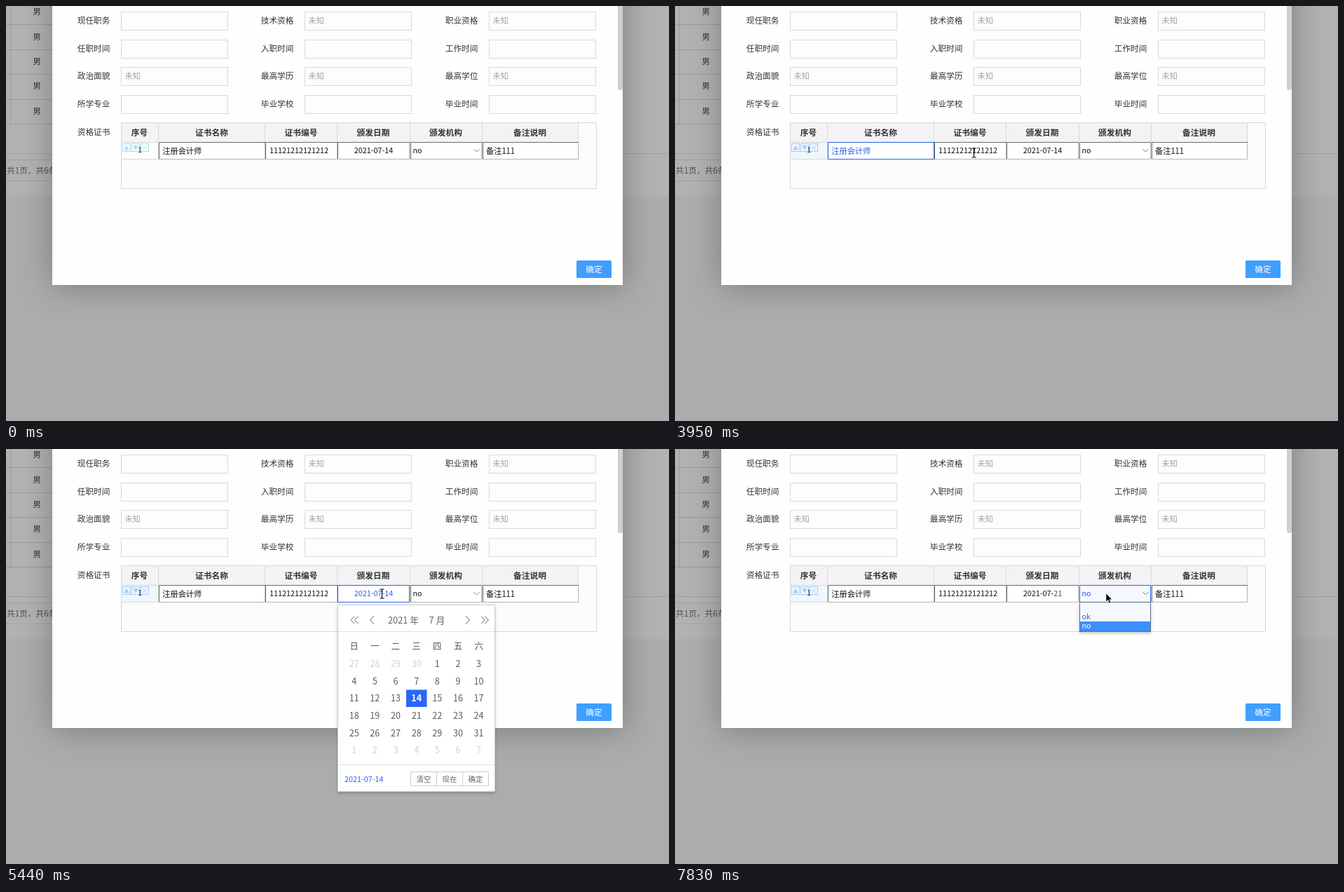
Write an HTML page that moves like this. It is 946 px wide and 592 px high and loops after 8000 ms.

```html
<!DOCTYPE html>
<html lang="zh-CN">
<head>
<meta charset="utf-8">
<title>资格证书</title>
<style>
  html, body { margin: 0; width: 100%; height: 100%; overflow: hidden; background: #abadac; }
  svg { display: block; width: 946px; height: 592px; }
  text { font-family: "Noto Sans CJK SC", "Noto Sans CJK", "Noto Sans", sans-serif; white-space: pre; }
</style>
</head>
<body>
<svg id="stage" viewBox="0 0 946 592">
  <defs>
    <filter id="deep" x="-20%" y="-30%" width="140%" height="160%" color-interpolation-filters="sRGB">
      <feDropShadow dx="1" dy="1" stdDeviation="23" flood-opacity=".3"/>
    </filter>
    <filter id="soft" x="-10%" y="-10%" width="120%" height="125%" color-interpolation-filters="sRGB">
      <feDropShadow dx="0" dy="2" stdDeviation="2" flood-opacity=".22"/>
    </filter>
  </defs>
</svg>
<script>
const LOOP = 8000, BLUE = '#2b62e8', LINE = '#d6d9d8';
const stage = document.getElementById('stage');

function add(parent, tag, attrs) {
  const el = document.createElementNS(stage.namespaceURI, tag);
  set(el, attrs);
  return parent.appendChild(el);
}
function set(el, attrs) {
  for (const k in attrs) el.setAttribute(k, attrs[k]);
}
const fillBox = (p, x, y, width, height, fill, more) => add(p, 'rect', { x, y, width, height, fill, ...more });
const frame = (p, x, y, w, h, fill, stroke) =>
  add(p, 'rect', { x: x + .5, y: y + .5, width: w - 1, height: h - 1, fill, stroke });
const path = (p, d, stroke, more) => add(p, 'path', { d, stroke, fill: 'none', ...more });
// x is the anchor, y the optical middle of the glyphs
function write(p, str, x, y, size, fill, anchor = 'start', more) {
  const el = add(p, 'text', { x, y: y + size * .38, 'font-size': size, fill, 'text-anchor': anchor, ...more });
  el.textContent = str;
  return el;
}
const show = (el, on) => set(el, { visibility: on ? 'visible' : 'hidden' });
const clamp = v => Math.min(1, Math.max(0, v));

// Dimmed page behind the dialog
fillBox(stage, 0, 0, 946, 592, '#abadac');
fillBox(stage, 0, 0, 946, 271, '#b2b2b2');
[26, 62, 97, 133, 168].forEach(y => fillBox(stage, 0, y, 70, 1, '#999'));
fillBox(stage, 6, 0, 1, 168, '#9c9c9c');
[8, 44, 79, 114, 150].forEach(y => write(stage, '男', 44, y, 11.7, '#333', 'middle'));
fillBox(stage, 0, 210, 946, 1, '#a0a0a0');
fillBox(stage, 0, 219, 70, 1, '#a0a0a0');
fillBox(stage, 0, 249, 70, 1, '#a0a0a0');
write(stage, '共1页，共6条', 1, 235, 11.7, '#505050');

// Dialog and form
fillBox(stage, 66, -300, 814, 698, '#fefefe', { filter: 'url(#deep)' });
fillBox(stage, 873, -10, 7, 130, '#d0d0d0', { rx: 3 });
const unknown = '未知';
[
  [8, ['现任职务', '', '技术资格', unknown, '职业资格', unknown]],
  [48, ['任职时间', '', '入职时间', '', '工作时间', '']],
  [87, ['政治面貌', unknown, '最高学历', unknown, '最高学位', unknown]],
  [127, ['所学专业', '', '毕业学校', '', '毕业时间', '']]
].forEach(([y, cells]) => [164, 426, 689].forEach((x, i) => {
  write(stage, cells[2 * i], x - 15.5, y + 12.7, 11.7, '#333', 'end');
  frame(stage, x, y, 153, 27, '#fbfefd', LINE);
  write(stage, cells[2 * i + 1], x + 5.5, y + 12.7, 11.2, '#a3a3a3');
}));
write(stage, '资格证书', 148.5, 180, 11.7, '#333', 'end');
fillBox(stage, 814, 363, 50, 25, '#409eff', { rx: 1.5 });
write(stage, '确定', 839, 376, 11.7, '#fff', 'middle');

// Certificate table
frame(stage, 164, 166, 679, 95, '#fcfcfc', LINE);
fillBox(stage, 165, 167, 652, 27, '#f3f3f5');
const rowTint = fillBox(stage, 165, 195, 53, 23, '#eff6fe');
fillBox(stage, 165, 194, 652, 1, LINE);
fillBox(stage, 165, 218, 653, 1, LINE);
[217, 369, 472, 576, 679, 816].forEach(x => fillBox(stage, x, 167, 1, 52, LINE));
[['序号', 190.5], ['证书名称', 293.5], ['证书编号', 421], ['颁发日期', 524], ['颁发机构', 627.5], ['备注说明', 747.5]]
  .forEach(([s, x]) => write(stage, s, x, 180.5, 11.7, '#333', 'middle', { 'font-weight': 700 }));

const tools = add(stage, 'g', {});
[166, 179, 192].forEach(x => add(tools, 'rect', { x: x + .5, y: 196.5, width: 11, height: 11, fill: 'none' }));
add(tools, 'path', { d: 'M169 205l3-5.5 3 5.5zM182 199.5h6l-3 5.5z', class: 'solid' });
add(tools, 'path', { d: 'M195 199.5l5.5 5.5M200.5 199.5l-5.5 5.5', fill: 'none' });
write(stage, '1', 191, 204.5, 11, '#333', 'middle');

function cell(x, w, str, tx, size = 10.8, anchor) {
  const g = add(stage, 'g', {});
  const bg = fillBox(g, x, 194, w, 25, '#fff');
  const light = path(g, `M${x + w - .5} 194v24.5H${x}`, '#b4b4b4');
  const dark = path(g, `M${x + .5} 218V194.5H${x + w}`, '#6c6c6c');
  const label = write(g, str, tx, 206.3, size, '#111', anchor);
  return {
    g, bg, label,
    focus(on) {
      set(light, { stroke: on ? BLUE : '#b4b4b4' });
      set(dark, { stroke: on ? BLUE : '#6c6c6c' });
      set(label, { fill: on ? BLUE : '#111' });
    }
  };
}
const nameCell = cell(218, 152, '注册会计师', 223.3, 11.2);
const codeCell = cell(370, 103, '11121212121212', 376);
const dateCell = cell(473, 103, '', 524.5, 10.8, 'middle');
const orgCell = cell(577, 102, 'no', 580.5);
cell(680, 137, '备注111', 685, 11.2);
const dateHead = add(dateCell.label, 'tspan', {});
const dateDay = add(dateCell.label, 'tspan', {});
dateHead.textContent = '2021-07-';
path(orgCell.g, 'M667.5 204l4 4 4-4', '#777');
const nameCaret = fillBox(stage, 279, 201, 1, 12, BLUE);
const codeCaret = fillBox(stage, 424, 201, 1, 12, BLUE);

// Drop-down list
const list = add(stage, 'g', {});
add(list, 'rect', { x: 577.5, y: 218.5, width: 101, height: 42, fill: '#f5f9ff', stroke: '#66707f', filter: 'url(#soft)' });
fillBox(list, 578, 246, 100, 14, '#3d8fff');
write(list, 'ok', 580.5, 239, 10.8, BLUE);
write(list, 'no', 580.5, 252.3, 10.8, '#fff');

// Date picker
const picker = add(stage, 'g', {});
add(picker, 'rect', { x: 473.5, y: 222.5, width: 224, height: 266, rx: 1, fill: '#fff', stroke: '#d0d0d0', filter: 'url(#soft)' });
fillBox(picker, 474, 260, 223, 1, '#e2e2e2');
fillBox(picker, 474, 450, 223, 1, '#e2e2e2');
path(picker, 'M497 239l-5 5 5 5M502.500 239l-5 5 5 5M525 238.500l-5.500 5.500 5.500 5.500' +
  'M656 238.500l5.500 5.500-5.500 5.500M678 239l5 5-5 5M683.500 239l5 5-5 5', '#999', { 'stroke-width': 1.1 });
write(picker, '2021 年', 567, 244, 12.8, '#666', 'middle');
write(picker, '7 月', 615, 244, 12.8, '#666', 'middle');
const colX = i => 496.7 + 29.65 * i;
[...'日一二三四五六'].forEach((s, i) => write(picker, s, colX(i), 281.7, 12.4, '#555', 'middle'));
const today = fillBox(picker, 571, 343.5, 29.5, 24.5, '#2a66fb');
const days = Array.from({ length: 42 }, (_, i) => {
  const n = i - 3, num = n < 1 ? n + 30 : n > 31 ? n - 31 : n;
  const tone = n === 14 ? 255 : n < 1 || n > 31 ? 208 : 90;
  const el = write(picker, num, colX(i % 7), 306.2 + 24.7 * Math.floor(i / 7), 12.6, '#555', 'middle',
    n === 14 ? { 'font-weight': 700 } : {});
  return { el, tone };
});
const footDate = write(picker, '2021-07-14', 483, 470.7, 10.8, BLUE);
['清空', '现在', '确定'].forEach((s, i) => {
  frame(picker, 577 + 37 * i, 460, 38, 21, '#fff', '#cfcfcf');
  write(picker, s, 596 + 37 * i, 470.7, 10.5, '#666', 'middle');
});

// Pointers
const arrow = add(stage, 'path', {
  d: 'M0 0V12l2.800-2.600 2 4.600 2-.9-2-4.400h3.900z', fill: '#000', stroke: '#fff', 'stroke-width': .6
});
const beam = path(stage, 'M-3 -6.500h2.200l.8.800.8-.800h2.200M0 -5.700V5.700M-3 6.500h2.200l.8-.800.8.800h2.200', '#000', { 'stroke-width': 1.1 });

// Pointer moves: start, end, from, to
const moves = [
  [570, 1330, [764, 500], [192, 212]],
  [1400, 2080, [192, 212], [300, 209]],
  [3360, 3430, [300, 209], [345, 208]],
  [3690, 3950, [345, 208], [426, 209]],
  [4420, 4760, [426, 209], [536, 206]],
  [5790, 6210, [536, 206], [577, 378]],
  [6660, 7230, [577, 378], [615, 206]]
];
function pointer(t) {
  const move = moves.filter(m => t >= m[0]).pop();
  if (!move) return null;
  const [start, end, a, b] = move;
  const held = t >= end ? end : start + Math.floor((t - start) / 70) * 70;
  const u = clamp((held - start) / (end - start));
  const e = u * u * (3 - 2 * u);
  return a.map((v, i) => v + (b[i] - v) * e);
}

function draw(t) {
  const within = (a, b) => t >= a && t < b;
  const at = pointer(t);
  const hover = !!at && at[1] < 219;
  const overText = hover && at[0] > 218 && at[0] < 576;
  show(arrow, at && !overText);
  show(beam, at && overText);
  if (at) {
    const [x, y] = at.map(Math.round);
    set(arrow, { transform: `translate(${x} ${y})` });
    set(beam, { transform: `translate(${x + .5} ${y + .5})` });
  }
  show(rowTint, hover);
  const toolTone = at ? '#a9cbf7' : '#a9dcf6';
  set(tools, { stroke: toolTone, fill: toolTone });

  nameCell.focus(within(2280, 4080));
  codeCell.focus(within(4080, 4830));
  dateCell.focus(within(4830, 6350));
  orgCell.focus(t >= 7430);
  set(orgCell.bg, { fill: t >= 7430 ? '#f5f9ff' : '#fff' });
  show(nameCaret, within(2410, 2810) || within(3360, 3890));
  show(codeCaret, within(4150, 4680));
  dateDay.textContent = t < 6350 ? '14' : '21';
  dateDay.style.fill = t < 6350 ? '' : '#555';
  show(list, t >= 7500);

  show(picker, within(5030, 6530));
  const slide = clamp((t - 5030) / 115);
  const settle = clamp((t - 5130) / 200);
  set(picker, {
    transform: `translate(0 ${-8 * (1 - slide)})`,
    opacity: t < 5110 ? .3 : .6 + .4 * clamp((t - 5110) / 200)
  });
  set(today, { opacity: .1 + .9 * settle });
  days.forEach(({ el, tone }) => {
    const c = Math.round(90 + (tone - 90) * settle);
    set(el, { fill: `rgb(${c},${c},${c})` });
  });
  set(footDate, { fill: settle < .5 ? '#555' : BLUE });
}

const began = performance.now();
function tick() {
  draw((performance.now() - began) % LOOP);
  requestAnimationFrame(tick);
}
tick();
</script>
</body>
</html>
```
